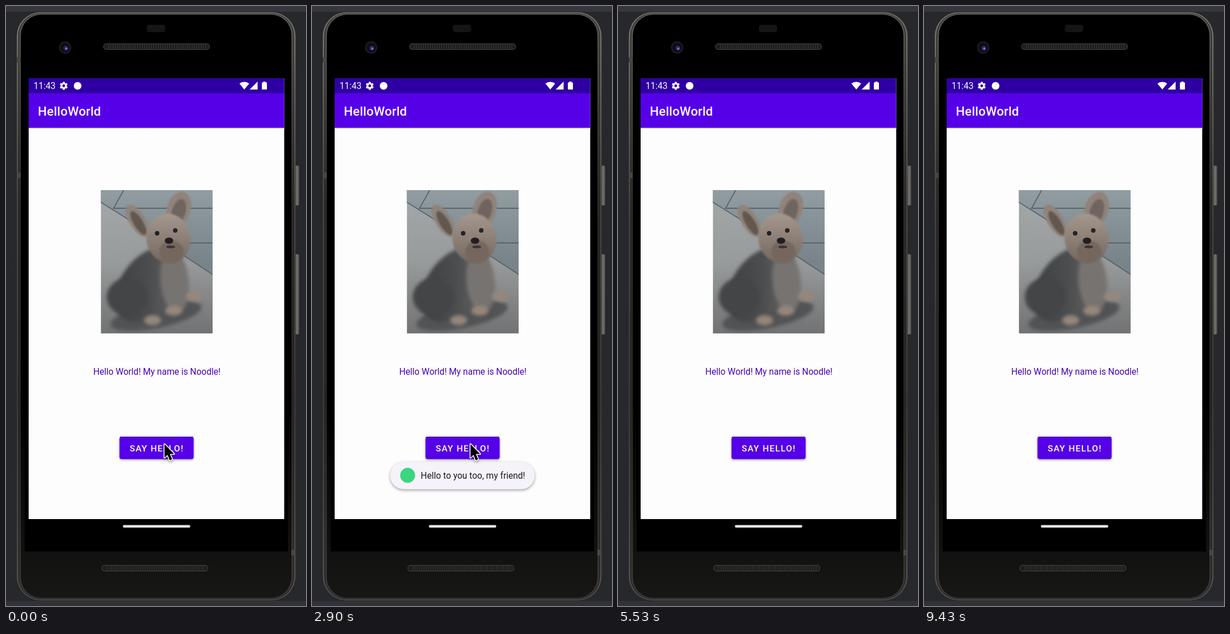
An HTML page with a canvas for the animation above (9.46 s loop, 530 by 1056 pixels).

```html
<!DOCTYPE html>
<html lang="en">
<head>
<meta charset="utf-8">
<title>HelloWorld</title>
<style>
  html, body { margin: 0; width: 100%; height: 100%; overflow: hidden; background: #27282c; }
  canvas { display: block; width: 530px; height: 1056px; }
</style>
</head>
<body>
<canvas id="stage" width="530" height="1056"></canvas>
<script>
const W = 530, H = 1056, LOOP = 9460;
const PURPLE = '#5600e8', DARK_PURPLE = '#2e00a3';
const screen = { x: 40, y: 127, w: 451.5, h: 776 };
const photo = { x: 167.5, y: 324, w: 197.5, h: 252.5 };
const button = { x: 200.5, y: 758, w: 131, h: 39.5, r: 4 };
const toast = { x: 138, y: 802.5, w: 255.5, h: 48, r: 24 };

const stage = document.getElementById('stage').getContext('2d');
const backdrop = document.createElement('canvas');
backdrop.width = W;
backdrop.height = H;

const clamp = v => Math.max(0, Math.min(1, v));
const progress = (t, from, to) => clamp((t - from) / (to - from));
const easeOut = p => 1 - (1 - p) ** 3;
const easeInOut = p => p * p * (3 - 2 * p);
const mix = (a, b, p) => a + (b - a) * p;

function box(c, x, y, w, h, fill, r = 0) {
  c.beginPath();
  c.roundRect(x, y, w, h, r);
  c.fillStyle = fill;
  c.fill();
}

const fillRect = (c, { x, y, w, h, r }, fill) => box(c, x, y, w, h, fill, r);

function oval(c, x, y, rx, ry, fill, angle = 0) {
  c.beginPath();
  c.ellipse(x, y, rx, ry, angle, 0, Math.PI * 2);
  c.fillStyle = fill;
  c.fill();
}

const disc = (c, x, y, r, fill) => oval(c, x, y, r, r, fill);

function clipTo(c, { x, y, w, h, r = 0 }, draw) {
  c.save();
  c.beginPath();
  c.roundRect(x, y, w, h, r);
  c.clip();
  draw();
  c.restore();
}

function text(c, str, x, y, size, color, weight = 400, spacing = 0) {
  c.font = `${weight} ${size}px Roboto, sans-serif`;
  c.letterSpacing = spacing + 'px';
  c.fillStyle = color;
  c.fillText(str, x, y);
}

function spread(gradient, colors) {
  colors.forEach((color, i) => gradient.addColorStop(i / (colors.length - 1), color));
  return gradient;
}

const across = (c, x1, x2, ...colors) => spread(c.createLinearGradient(x1, 0, x2, 0), colors);
const down = (c, y1, y2, ...colors) => spread(c.createLinearGradient(0, y1, 0, y2), colors);

function withShadow(c, color, blur, dy, draw) {
  c.save();
  c.shadowColor = color;
  c.shadowBlur = blur;
  c.shadowOffsetY = dy;
  draw();
  c.restore();
}

function drawSpeaker(c, x, y) {
  box(c, x, y, 188, 11, '#4b4a46', 5);
  box(c, x + 1, y + 1, 186, 9, '#1d1d1b', 4);
  for (let i = 2; i < 46; i++) box(c, x + 4 * i, y + 2, 2, 7, '#2e2d2b');
}

function drawSideButton(c, y, h) {
  box(c, 510, y, 8, h, across(c, 510, 518, '#343432', '#777672', '#4b4a47'), 2);
}

function drawPhone(c) {
  box(c, 0, 0, W, H, '#27282c');
  box(c, 0, 0, W, 10, '#36373c');
  box(c, 0, 1047, W, 9, '#313237');
  drawSideButton(c, 281, 70);
  drawSideButton(c, 437, 141);

  // Nested shells, from the metal rim to the glass
  const shells = [
    ['#777671', '#454441', '#3b3a38', '#53524e'],
    ['#3a3936', '#262523', '#242321', '#2a2927'],
    ['#5d5c58', '#2d2c2a', '#282725', '#3c3b38'],
    ['#000000', '#000000', '#000000', '#171716'],
  ];
  shells.forEach((colors, i) => {
    const inset = i * 2;
    box(c, 19 + inset * 1.2, 11 + inset * 0.7, 492.5 - inset * 2.4, 1035 - inset * 1.4,
      down(c, 11, 1046, ...colors), 42 - inset);
  });
  box(c, 33, 100, 465, 860, '#000');

  // Antenna breaks
  for (const y of [90, 293, 957])
    box(c, y > 900 ? 504 : 19, y, 7, 10, '#474642');

  disc(c, 104.5, 73, 11, '#1a1a1f');
  disc(c, 104.5, 73, 8, '#0b0b13');
  disc(c, 105.5, 74, 4.5, '#292151');
  disc(c, 106.5, 75, 2.2, '#7568d8');
  box(c, 249, 33, 32, 13, '#151517', 4);
  drawSpeaker(c, 172, 66);
  drawSpeaker(c, 169, 984);
  box(c, 206.5, 913.5, 119, 4.5, '#ebe5ec', 2);
}

function drawStatusIcons(c) {
  const middle = 140.5, bottom = 147;
  c.save();
  c.translate(102, middle);
  for (let i = 0; i < 6; i++) {
    c.rotate(Math.PI / 3);
    box(c, -2, -7, 4, 4, '#fff', 1);
  }
  disc(c, 0, 0, 5.2, '#fff');
  disc(c, 0, 0, 2.4, DARK_PURPLE);
  c.restore();
  disc(c, 126.5, middle, 6.8, '#fff');

  c.fillStyle = '#fff';
  c.beginPath();
  c.moveTo(421, bottom);
  c.arc(421, bottom, 13.5, -Math.PI * 0.72, -Math.PI * 0.28);
  c.fill();
  c.fill(new Path2D('M430.5 147h14v-14z'));
  box(c, 452, 134.5, 9, 12.5, '#fff', 1);
  box(c, 454.5, 133, 4, 2, '#fff');
}

function drawFloor(c) {
  const { x, y, w, h } = photo;
  fillRect(c, photo, down(c, y, y + h, '#a4a8a8', '#989b9b', '#717273'));
  const rugEdge = 'M167 345L212 373L366 473';
  c.fillStyle = down(c, y, y + h / 2, '#929da2', '#78848a');
  c.fill(new Path2D(rugEdge + 'V323H167Z'));
  c.strokeStyle = '#59636a';
  c.lineWidth = 1.8;
  c.stroke(new Path2D(rugEdge + 'M208 324L190 356H366M314 417H366'));
}

function drawDog(c) {
  const fur = across(c, 180, 330, '#3b3e41', '#4b4d4f', '#77716d');
  const tan = '#8f837b', face = down(c, 365, 450, '#a4988e', '#8d8077', '#74685f');

  c.filter = 'blur(3px)';
  oval(c, 265, 545, 82, 22, '#525354', -0.2);
  oval(c, 252, 490, 48, 74, fur, 0.65);
  oval(c, 298, 485, 25, 55, '#777370', -0.1);
  oval(c, 214, 512, 36, 33, '#434547');
  for (let i = 0; i < 3; i++)
    oval(c, 259 + 37 * i, 553 - 13 * i - 4 * i * i, 15, 9, '#95877c');

  c.filter = 'blur(1.5px)';
  oval(c, 232, 378, 14, 32, tan, -0.55);
  oval(c, 234, 382, 8, 24, '#61574f', -0.55);
  oval(c, 305, 358, 21, 32, tan, 0.3);
  oval(c, 305, 362, 12, 23, '#70655e', 0.3);
  oval(c, 287, 409, 39, 44, face, -0.2);
  oval(c, 292, 432, 21, 19, '#75675d');

  c.filter = 'blur(.7px)';
  disc(c, 267, 400, 4, '#242122');
  disc(c, 299, 395, 4, '#292526');
  oval(c, 288, 413, 7.5, 5.5, '#211f22');
  oval(c, 291, 424, 8, 2.5, '#40332f');
  c.filter = 'none';
}

function drawScreen(c) {
  const { x, y, w } = screen;
  fillRect(c, screen, '#fdfdfd');
  box(c, x, 214, w, 3, down(c, 214, 217, '#dedbe3', '#fdfdfd'));
  box(c, x, y, w, 27, DARK_PURPLE);
  box(c, x, 153.5, w, 61, PURPLE);
  text(c, '11:43', 48.8, 146.3, 15.57, '#fff');
  text(c, 'HelloWorld', 56.3, 193, 22.3, '#fff', 500, 0.15);
  drawStatusIcons(c);
  clipTo(c, photo, () => {
    drawFloor(c);
    drawDog(c);
  });
  text(c, 'Hello World! My name is Noodle!', 154.2, 648.5, 15.57, '#4700b8');
}

function drawButton(c, t) {
  withShadow(c, 'rgba(0,0,0,.35)', 4, 1.5, () => fillRect(c, button, PURPLE));
  box(c, button.x + 1, button.y, button.w - 2, 1, '#3900a0');
  const alpha = 0.17 * progress(t, 380, 450) * (1 - progress(t, 720, 960));
  const reach = mix(12, 97, easeOut(progress(t, 380, 680)));
  clipTo(c, button, () => disc(c, 279, 772, reach, `rgba(255,255,255,${alpha})`));
  text(c, 'SAY HELLO!', 218.4, 783.8, 15.5, '#fff', 500, 1.3);
}

function drawToast(c, t) {
  c.save();
  c.globalAlpha = easeInOut(progress(t, 480, 720)) * (1 - easeInOut(progress(t, 4900, 5120)));
  withShadow(c, 'rgba(0,0,0,.36)', 5, 2, () => fillRect(c, toast, '#f6f2fa'));
  disc(c, 169, 826, 13.2, '#3dd680');
  text(c, 'Hello to you too, my friend!', 192.1, 832.2, 15.57, '#1b1a1e');
  c.restore();
}

const arrow = new Path2D('M0 0V24l5.3-5 4 9.5 4.2-1.8-4-9.3H17Z');

function drawPointer(c, t) {
  if (t >= 5200) return;
  const p = easeInOut(progress(t, 4050, 4700));
  c.save();
  c.translate(mix(280, 134.5, p), mix(771, 420, p));
  c.lineJoin = 'round';
  c.strokeStyle = '#fff';
  c.lineWidth = 3;
  withShadow(c, 'rgba(0,0,0,.4)', 4, 2, () => c.stroke(arrow));
  c.fillStyle = '#000';
  c.fill(arrow);
  c.restore();
}

function frame(now) {
  const t = now % LOOP;
  stage.drawImage(backdrop, 0, 0);
  drawButton(stage, t);
  drawToast(stage, t);
  drawPointer(stage, t);
  requestAnimationFrame(frame);
}

const still = backdrop.getContext('2d');
drawPhone(still);
drawScreen(still);
requestAnimationFrame(frame);
</script>
</body>
</html>
```
